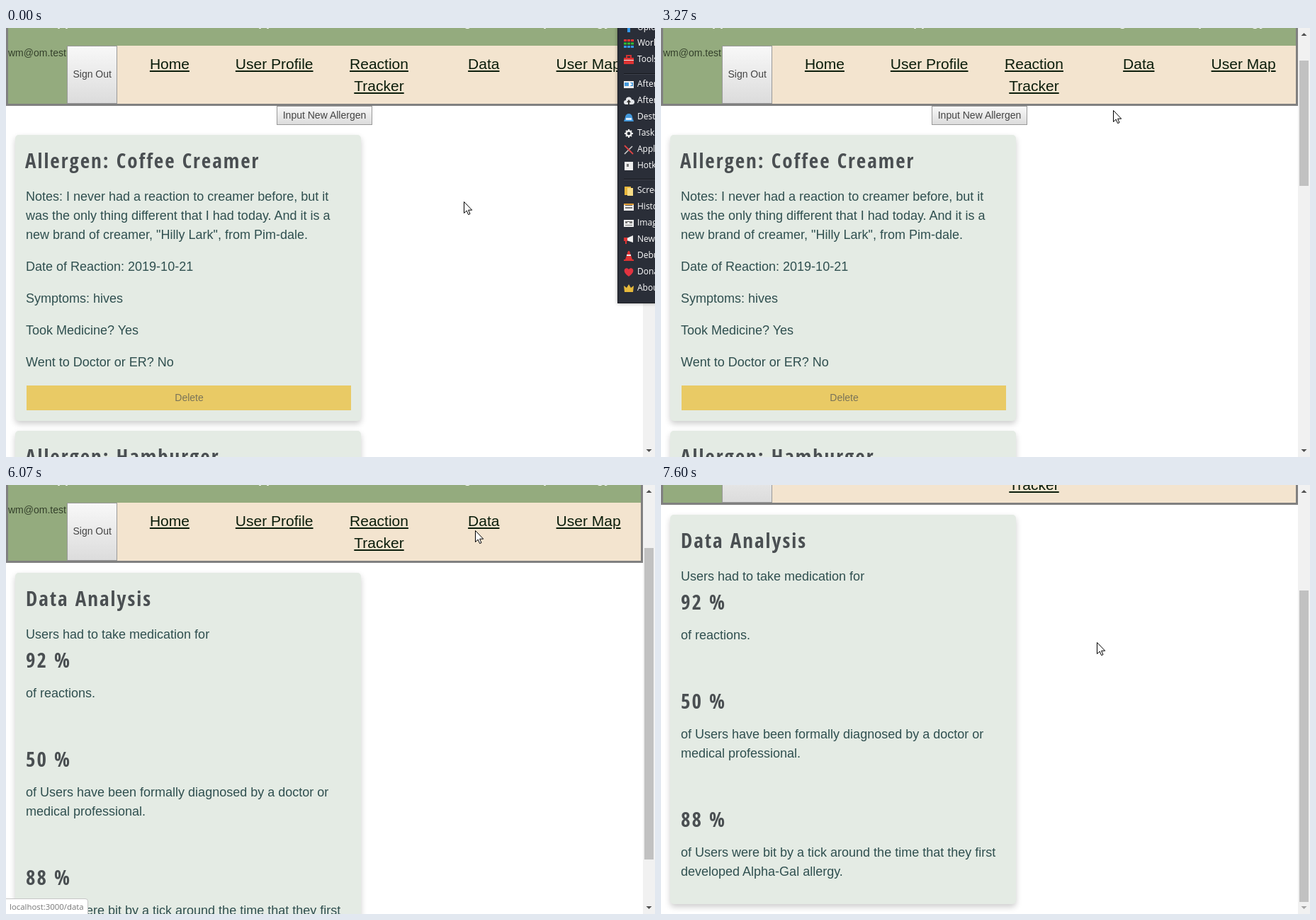
These frames come from a looping animation (916x606 px, 8 s). An HTML page:

```html
<!DOCTYPE html>
<html lang="en">
<head>
<meta charset="utf-8">
<title>Allergen tracker</title>
<style>
html, body { margin: 0; width: 100%; height: 100%; overflow: hidden; background: #fff; }
#stage { position: relative; width: 916px; height: 606px; overflow: hidden; font: 18px "Liberation Sans", Arial, sans-serif; color: #2f4f4f; }
#stage div, #stage span, #stage svg { position: absolute; box-sizing: border-box; }
span { white-space: pre; line-height: 0; }
.mid { transform: translateX(-50%); }
.small { font-size: 14px; color: #444; }
.mail { font-size: 14px; color: #34402b; }
.del { font-size: 14px; color: #797359; }
.nav { font-size: 21px; color: #0b1d0b; text-decoration: underline; }
.title { font: 300 29px/0 "Open Sans Condensed", "Open Sans", sans-serif; font-stretch: 75%; letter-spacing: 2px; color: #4a4f52; }
.banner { color: #fff; font-weight: bold; }
.item { font: 12px/0 "Open sans", sans-serif; color: #fff; }
.url { font: 11.4px/0 "Open Sans", sans-serif; color: #777; }
.card { left: 13px; width: 488px; background: #e4ebe4; border-radius: 5px; box-shadow: 0 4px 8px rgba(0,0,0,.2); }
.btn { background: linear-gradient(#f8f8f8, #dcdcdc); border: 1px solid #999; }
#doc { left: 0; top: 0; width: 899px; height: 800px; }
#head { left: 0; top: -60px; width: 899px; height: 170px; background: #94ab7e; border: 3px solid #808080; }
#bar { left: 157px; top: 25px; width: 739px; height: 82px; background: #f3e4cf; }
#scroll { left: 899px; top: 0; width: 17px; height: 606px; background: #f1f1f1; }
#thumb { left: 2px; width: 13px; background: #c1c1c1; }
#menu { left: 863px; top: -6px; width: 80px; height: 395px; background: #2a2e38; border: 1px solid #1b1d24; box-shadow: 0 0 5px rgba(0,0,0,.35); }
#menu svg { left: 8px; }
.rule { left: 8px; width: 70px; height: 2px; background: #16181e; border-bottom: 1px solid #3d414c; }
#status { left: -1px; top: 584px; width: 117px; height: 24px; background: #fff; border: 1px solid #c6c6c6; border-radius: 0 4px 0 0; }
</style>
</head>
<body>
<div id="stage">
  <div id="doc">
    <div id="head"></div>
    <div id="bar"></div>
    <div class="btn" style="left:86px;top:25px;width:71px;height:82px"></div>
    <div id="list">
      <div class="btn" style="left:382px;top:110px;width:135px;height:27px"></div>
      <div class="card" style="top:151px;height:404px"></div>
      <div class="card" style="top:569px;height:404px"></div>
      <div style="left:29px;top:505px;width:458px;height:35px;background:#e9ca65"></div>
    </div>
    <div id="data">
      <div class="card" style="top:124px;height:550px"></div>
    </div>
  </div>
  <div id="scroll">
    <div id="thumb"></div>
    <svg width="17" height="606"><path d="M4.5 11 8.5 7 12.5 11Z" fill="#505050"/><path id="down" d="M4.5 595 8.5 599 12.5 595Z"/></svg>
  </div>
  <div id="status"></div>
  <div id="menu"></div>
  <svg id="arrow" width="14" height="22"><path d="M.5 .5V16.5L4.2 13.1 6.6 18.6 9 17.6 6.6 12.2H11.7Z" fill="#fff" stroke="#000"/></svg>
  <svg id="hand" width="20" height="26"><path d="M6 14V2.5Q6 .8 7.5 .8T9 2.5V8Q9.3 6.8 10.6 7T12 8.5Q12.4 7.6 13.7 7.9T15 9.6Q15.6 8.9 16.7 9.3T17.7 11V16Q17.7 18 15.8 20.5V23.3H7.3V21Q3.5 16.5 1.4 13.3.4 11.4 1.8 10.8T6 14ZM9 8V12M12 8.5V12.5M15 9.6V13" fill="#fff" stroke="#000"/></svg>
</div>
<script>
const $ = id => document.getElementById(id);
const text = (box, x, y, str, cls = '') => {
  const s = document.createElement('span');
  s.className = cls;
  s.textContent = str;
  s.style.left = x + 'px';
  s.style.top = y + 'px';
  box.append(s);
  return s;
};
const doc = $('doc'), list = $('list'), data = $('data'), menu = $('menu');

// Header
[[62, 'app'], [346, 'app'], [646, 'g'], [758, 'p'], [833, 'gy']].forEach(([x, s]) => text(doc, x, -9, s, 'banner'));
text(doc, 3, 35, 'wm@om.test', 'mail');
text(doc, 121.7, 65, 'Sign Out', 'small mid');
const links = ['Home', 'User Profile', 'Reaction', 'Data', 'User Map'].map((s, i) =>
  text(doc, 230.9 + 147.8 * i, 51, s, 'nav mid'));
text(doc, 526.5, 82, 'Tracker', 'nav mid');

// Allergen list
text(list, 449.5, 123, 'Input New Allergen', 'small mid');
text(list, 27, 187, 'Allergen: Coffee Creamer', 'title');
text(list, 27, 605, 'Allergen: Hamburger', 'title');
text(list, 258.5, 522, 'Delete', 'del mid');
[[238, 'Notes: I never had a reaction to creamer before, but it'],
 [265, 'was the only thing different that I had today. And it is a'],
 [292, 'new brand of creamer, "Hilly Lark", from Pim-dale.'],
 [337, 'Date of Reaction: 2019-10-21'],
 [382, 'Symptoms: hives'],
 [427, 'Took Medicine? Yes'],
 [472, 'Went to Doctor or ER? No']].forEach(([y, s]) => text(list, 28, y, s));

// Data analysis
text(data, 28, 160, 'Data Analysis', 'title');
[[211, 'Users had to take medication for'],
 [294, 'of reactions.'],
 [434, 'of Users have been formally diagnosed by a doctor or'],
 [461, 'medical professional.'],
 [601, 'of Users were bit by a tick around the time that they first'],
 [628, 'developed Alpha-Gal allergy.']].forEach(([y, s]) => text(data, 28, y, s));
const stats = [[247, 92], [387, 50], [554, 88]].map(([y, n]) => ({ n, el: text(data, 28, y, '%', 'title') }));

text($('status'), 5, 11, 'localhost:3000/data', 'url');

// Tray menu: y, label, icon drawn in a 14px box
const box = (c, x, y, w, h) => `<path fill="${c}" d="M${x} ${y}h${w}v${h}h${-w}z"/>`;
const line = (c, d, w = 2) => `<path fill="none" stroke="${c}" stroke-width="${w}" d="${d}"/>`;
const fill = (c, d) => `<path fill="${c}" d="${d}"/>`;
const grid = ['#e33', '#3b3', '#39e'].map((c, i) => [0, 5, 10].map(x => box(c, x, 1 + i * 4.5, 4, 3)).join('')).join('');
const photo = box('#eee', 0, 2, 14, 10) + box('#555', 2, 4, 10, 1);
[[-1, 'Upload', fill('#39e', 'M7 0 12 6H9V13H5V6H2Z')],
 [21, 'Workflows', grid],
 [44, 'Tools', line('#c33', 'M4 4V1H10V4') + box('#d33', 0, 4, 14, 9) + box('#eee', 0, 7, 14, 1)],
 [79, 'After capture', box('#eee', 0, 2, 14, 10) + box('#49d', 1, 4, 12, 5) + fill('#fff', 'M7 3 12 6.5 7 10Z')],
 [102, 'After upload', fill('#e4e6ea', 'M3 12A3 3 0 0 1 3 6 4 4 0 0 1 11 5 3.5 3.5 0 0 1 12 12Z') + fill('#333', 'M7 5 10 9H8V12H6V9H4Z')],
 [125, 'Destinations', fill('#49d', 'M2 7A5 5 0 0 1 12 7L14 13H0Z') + box('#def', 3, 8, 8, 3)],
 [148, 'Task settings', '<circle cx="7" cy="7" r="3.5" fill="none" stroke="#eee" stroke-width="2.4"/>' + line('#eee', 'M7 1V3M7 11V13M1 7H3M11 7H13M3 3 4 4M10 10 11 11M11 3 10 4M4 10 3 11')],
 [171, 'Application', line('#ccc', 'M1 13 12 2', 1.6) + line('#d44', 'M1 1 13 13', 1.8)],
 [194, 'Hotkey', box('#eee', 1, 1, 12, 12) + box('#777', 4, 4, 3, 4)],
 [229, 'Screenshots', box('#e9b73c', 1, 1, 9, 12) + box('#f7dc86', 5, 3, 8, 11)],
 [252, 'History', photo + box('#e8a33a', 0, 2, 14, 2) + box('#777', 2, 7, 10, 2)],
 [275, 'Image history', photo + box('#777', 2, 4, 3, 3) + box('#777', 8, 4, 4, 3) + box('#777', 2, 9, 10, 1)],
 [298, 'News', fill('#eee', 'M4 5 13 1V11L4 8Z') + fill('#d33', 'M0 4H5V9H4V13H2V9H0Z')],
 [321, 'Debug', fill('#d33', 'M6 0H8L12 12H2Z') + box('#eee', 4, 5, 6, 2) + box('#d33', 0, 12, 14, 2)],
 [344, 'Donate', fill('#e23340', 'M7 13C-5 5 3-2 7 3 11-2 19 5 7 13Z')],
 [367, 'About', fill('#e6b93c', 'M0 3 4 6 7 1 10 6 14 3 13 12H1Z')]
].forEach(([y, s, icon]) => {
  menu.insertAdjacentHTML('beforeend', `<svg width="15" height="14" style="top:${y - 1}px">${icon}</svg>`);
  text(menu, 27, y + 5, s, 'item');
});
[64, 213].forEach(y => menu.insertAdjacentHTML('beforeend', `<div class="rule" style="top:${y + 5}px"></div>`));

// Pointer hot spot: tick, x, y (15 ticks per second)
const path = [[23, 646, 245], [28, 650, 218], [33, 655, 188], [36, 655, 170], [43, 648, 139], [49, 638, 116],
  [56, 645, 82], [62, 659, 57], [64, 660, 55], [66, 677, 53], [68, 665, 51], [90, 665, 51], [93, 655, 90],
  [96, 634, 168], [100, 615, 222]];
const pointer = n => {
  const i = path.findIndex(p => p[0] > n);
  if (i === 0) return path[0].slice(1);
  if (i < 0) return path[path.length - 1].slice(1);
  const [a, ax, ay] = path[i - 1], [b, bx, by] = path[i], k = (n - a) / (b - a);
  return [Math.round(ax + (bx - ax) * k), Math.round(ay + (by - ay) * k)];
};
const show = (el, on) => { el.style.visibility = on ? 'visible' : 'hidden'; };
const move = (el, x, y) => { el.style.transform = `translate(${x}px,${y}px)`; };
const scrolls = [19, 44, 66, 82];

function draw(now) {
  const n = Math.floor((now % 8000 + 4) * 0.015);
  const [x, y] = pointer(n);
  const over = x > 651 && x < 698 && y < 64;
  const second = n >= 76;
  const scroll = n < 111 ? 0 : scrolls[Math.min(n - 111, 3)];

  show(menu, n < 13);
  show(list, !second);
  show(data, second);
  show($('status'), n >= 66 && n < 95);
  stats.forEach(s => { s.el.textContent = n >= 83 ? s.n + ' %' : '%'; });
  links[3].style.color = over ? '#8b0000' : '';

  move(doc, 0, -scroll);
  $('thumb').style.top = (second ? 89 + Math.round(scroll * 0.732) : 46) + 'px';
  $('thumb').style.height = (second ? 440 : 177) + 'px';
  $('down').setAttribute('fill', scroll === 82 ? '#a3a3a3' : '#505050');

  show($('arrow'), !over);
  show($('hand'), over);
  move($('arrow'), x, y);
  move($('hand'), x - 7, y);
}
const start = performance.now();
const loop = () => { draw(performance.now() - start); requestAnimationFrame(loop); };
loop();
</script>
</body>
</html>
```
